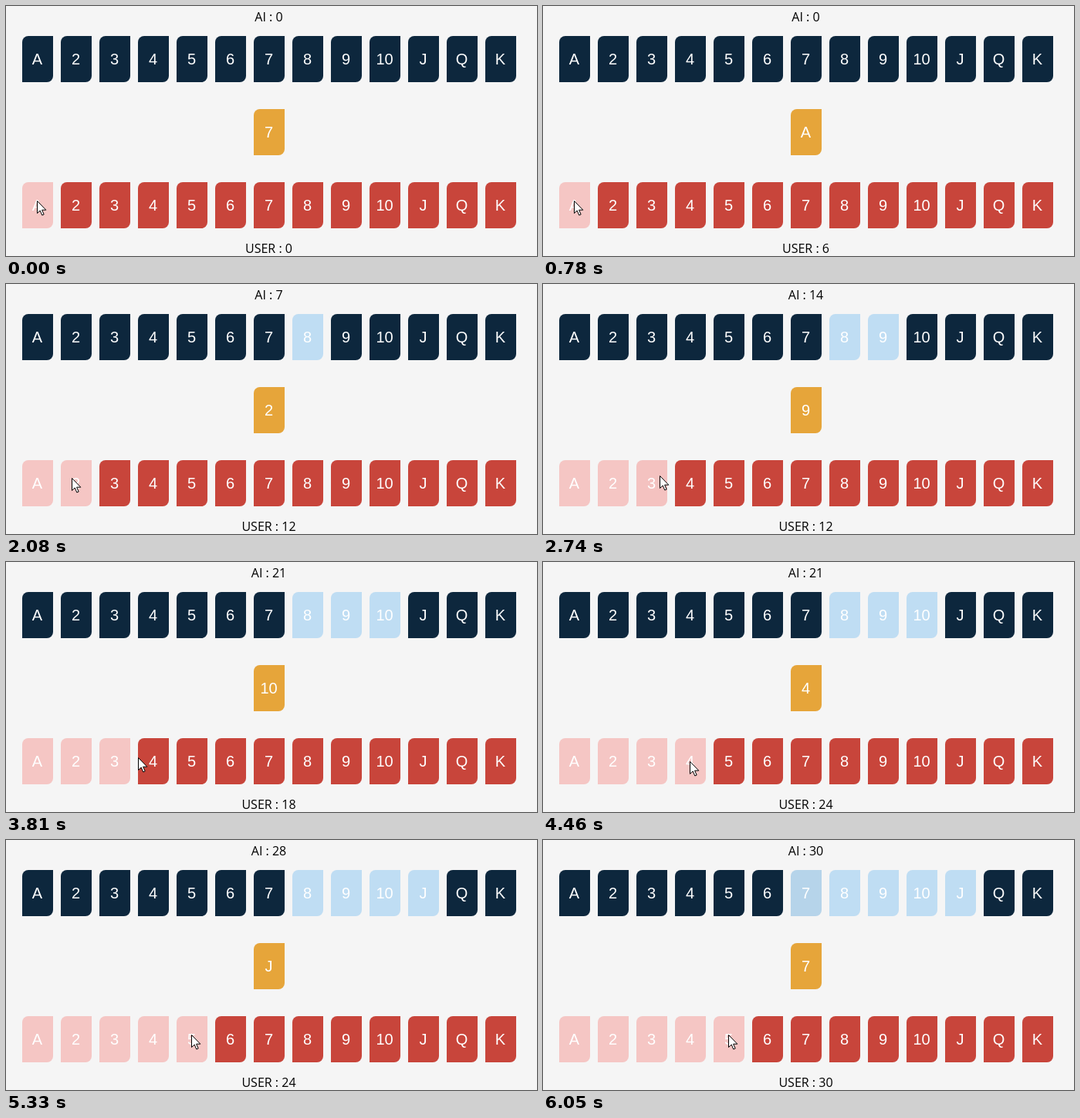
Animation, 688 px wide and 325 px high, one loop 6.64 s. Source, as an HTML page:

```html
<!DOCTYPE html>
<html lang="en">
<head>
<meta charset="utf-8">
<title>Card game</title>
<style>
html, body { margin: 0; width: 100%; height: 100%; overflow: hidden; background: #f5f5f5; }
svg { display: block; width: 688px; height: 325px; }
text { text-anchor: middle; }
.label { font: 20px "Liberation Sans", Arial, sans-serif; fill: #fff; }
.score { font: 16px "Open Sans", "Noto Sans", sans-serif; fill: #000; }
</style>
</head>
<body>
<svg id="stage" viewBox="0 0 688 325"></svg>
<script>
const LOOP = 6640;
const FADE = 200;
const RANKS = ['A', '2', '3', '4', '5', '6', '7', '8', '9', '10', 'J', 'Q', 'K'];
const NAVY = [13, 39, 61], SKY = [191, 221, 243];
const RED = [200, 69, 59], PINK = [245, 198, 196];
const GOLD = [230, 165, 58];

// The screen refreshes in bursts: [first, last, count].
const BURSTS = [
  [650, 780, 2], [1000, 1440, 7], [1870, 1870, 1], [2080, 2080, 1],
  [2450, 2740, 5], [3170, 3250, 2], [3590, 4030, 7], [4310, 4310, 1],
  [4460, 4460, 1], [4820, 5330, 8], [5480, 5550, 2], [5920, 6050, 3]
];

// One round each: hover, press and release of the user's card, then the AI's reply.
const ROUNDS = [
  { user: 0, hover: -FADE, press: 650, release: 780, ai: 7, reply: 1215 },
  { user: 1, hover: 1217, press: 1870, release: 2080, ai: 8, reply: 2440 },
  { user: 2, hover: 2585, press: 3170, release: 3250, ai: 9, reply: 3570 },
  { user: 3, hover: 3810, press: 4310, release: 4460, ai: 10, reply: 4810 },
  { user: 4, hover: 5130, press: 5480, release: 5550, ai: 6, reply: 5905 }
];

// Pointer moves: start, end, target x, target y.
const MOVES = [
  [0, 0, 40, 253], [960, 1300, 85, 252], [2420, 2700, 151, 249],
  [3660, 3960, 190, 259], [4970, 5250, 240, 253]
];

const stage = document.getElementById('stage');

function add(tag, attrs, text = '') {
  const el = document.createElementNS('http://www.w3.org/2000/svg', tag);
  for (const key in attrs) el.setAttribute(key, attrs[key]);
  el.textContent = text;
  return stage.appendChild(el);
}

const rgb = c => `rgb(${c.map(Math.round)})`;
const clamp = v => Math.min(1, Math.max(0, v));
const mix = (a, b, k) => a.map((v, i) => v + (b[i] - v) * k);

function makeCard(x, y, color, rank) {
  const d = `M${x + 8} ${y}h32v52a8 8 0 0 1-8 8h-32v-52a8 8 0 0 1 8-8z`;
  return {
    face: add('path', { d, fill: rgb(color) }),
    label: add('text', { class: 'label', x: x + 19.5, y: y + 37 }, rank)
  };
}

const makeRow = (y, color) => RANKS.map((rank, i) => makeCard(21 + 50 * i, y, color, rank));

const aiRow = makeRow(39, NAVY);
const pile = makeCard(321, 134, GOLD, '7');
const userRow = makeRow(229, RED);
const aiScore = add('text', { class: 'score', x: 340.5, y: 20 });
const userScore = add('text', { class: 'score', x: 340.5, y: 321 });
const halo = add('circle', { r: 12, fill: '#ff0', 'fill-opacity': 0.47 });
const pointer = add('path', {
  d: 'M.5.5v16l3.7-3.5 2.6 6 2.4-1-2.6-5.8h5.2z',
  fill: '#fff', stroke: '#000', 'stroke-width': 1
});

// CSS "ease": cubic-bezier(.25, .1, .25, 1)
function ease(x) {
  const bez = (a, b, s) => 3 * a * s * (1 - s) ** 2 + 3 * b * s * s * (1 - s) + s ** 3;
  let lo = 0, hi = 1;
  for (let i = 0; i < 20; i++) {
    const mid = (lo + hi) / 2;
    if (bez(0.25, 0.25, mid) < x) lo = mid; else hi = mid;
  }
  return bez(0.1, 1, lo);
}

const fade = (t, start) => ease(clamp((t - start) / FADE));

function lastRefresh(t) {
  let shown = 0;
  for (const [first, last, count] of BURSTS) {
    if (t < first) break;
    const gap = count > 1 ? (last - first) / (count - 1) : 1;
    shown = Math.min(last, first + Math.floor((t - first) / gap + 1e-6) * gap);
  }
  return shown;
}

function pointerAt(t) {
  let pos = [40, 253];
  for (const [start, end, x, y] of MOVES) {
    if (t >= start) pos = mix(pos, [x, y], clamp((t - start) / (end - start || 1)));
  }
  return pos.map(Math.round);
}

function render(time) {
  const t = lastRefresh(time);
  let top = 6, ai = 0, user = 0, pressed = false;

  for (const r of ROUNDS) {
    userRow[r.user].face.setAttribute('fill', rgb(mix(RED, PINK, fade(t, r.hover))));
    aiRow[r.ai].face.setAttribute('fill', rgb(mix(NAVY, SKY, fade(t, r.reply))));
    if (t >= r.press && t < r.release) pressed = true;
    if (t >= r.release) {
      user += Math.abs(top - r.user);
      top = r.user;
    }
    if (t >= r.reply) {
      ai += Math.abs(top - r.ai);
      top = r.ai;
    }
  }

  pile.label.textContent = RANKS[top];
  aiScore.textContent = `AI : ${ai}`;
  userScore.textContent = `USER : ${user}`;

  const [x, y] = pointerAt(t);
  pointer.setAttribute('transform', `translate(${x} ${y})`);
  halo.setAttribute('cx', x);
  halo.setAttribute('cy', y);
  halo.setAttribute('visibility', pressed ? 'visible' : 'hidden');
}

const begin = performance.now();
function tick() {
  render((performance.now() - begin) % LOOP);
  requestAnimationFrame(tick);
}
tick();
</script>
</body>
</html>
```
